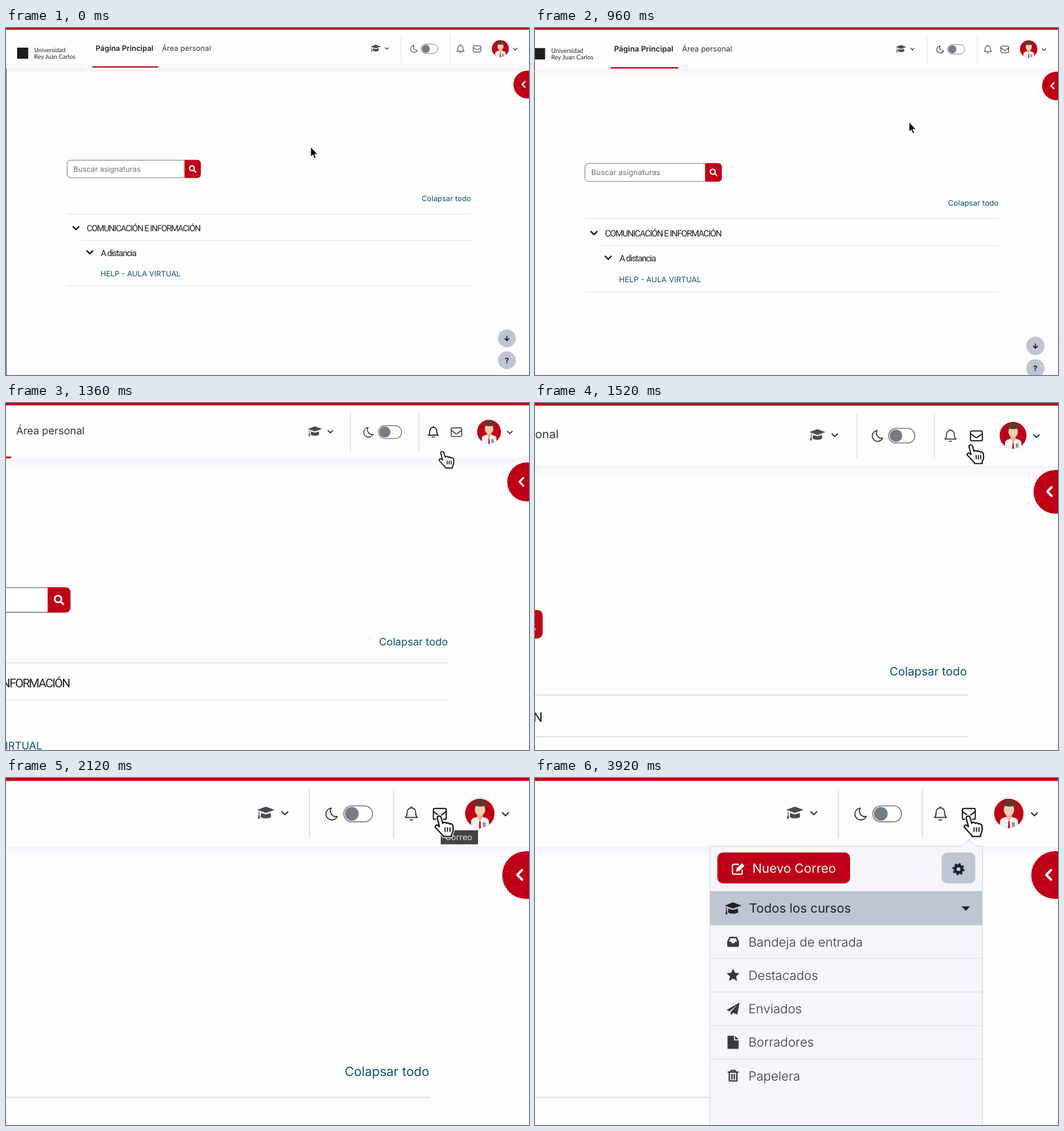
An HTML page that plays this animation: 800x531 px, repeating every 7.12 s.

```html
<!DOCTYPE html>
<html lang="es">
<head>
<meta charset="utf-8">
<title>Aula virtual</title>
<style>
  html, body { margin: 0; width: 100%; height: 100%; overflow: hidden; background: #fdfdfd; }
  svg { display: block; width: 100%; height: 100%; }
  text { font: 11.4px Inter, sans-serif; text-rendering: geometricPrecision; fill: #1d2125; }
  .logo { font: 9.2px Lato, sans-serif; }
  .current { font-weight: 600; }
  .plain { fill: #33383d; }
  .hint { fill: #6a7078; }
  .help { font-weight: 700; text-anchor: middle; }
  .link { fill: #12506e; }
  .heading { font: 13.2px Roboto, sans-serif; letter-spacing: -1.05px; }
  .tip { font-size: 12.8px; fill: #e6e6e6; }
  #menu text { font-size: 19.4px; }
  #menu .button { fill: #fff; }
  #menu .row text { font-weight: 300; fill: #343a40; }
  .red { fill: #bf0016; }
  .grey { fill: #bec5d3; }
  .dark { fill: #343a40; }
  .line { fill: none; stroke: #dee0e5; }
  .stroke { fill: none; stroke: #343a40; stroke-linecap: round; stroke-linejoin: round; }
  .stroke.white { stroke: #fff; }
  .stroke.black { stroke: #111; }
</style>
</head>
<body>
<svg viewBox="0 0 800 531" preserveAspectRatio="none">
  <defs>
    <linearGradient id="shade" x2="0" y2="1">
      <stop stop-color="#f3f3fb"/><stop offset="1" stop-color="#fdfdfd"/>
    </linearGradient>
    <clipPath id="round"><circle cx="756.2" cy="31.5" r="13.2"/></clipPath>
    <path id="cap" d="M0 3.4 7.8.5 15.6 3.4 7.8 6.2ZM3.5 6.1 7.8 7.5 12.1 6.1 12.5 9.6C10.4 11.4 5.2 11.4 3.1 9.6ZM1.4 4.9 2.1 5.1V7.8L2.6 11.4H.7L1.4 7.8Z"/>
    <path id="chevron" d="M-2.6-1.3 0 1.3 2.6-1.3"/>
    <path id="handShape" d="M-3 3C-3.5-1 2-1 3 2L5.5 11C6 8.5 10 8.5 11 11 12 9.5 15 10 16 12 18 11 20.5 12 21 14.5L21.5 20C21.5 24 20 26 19 28V31H6V29.5C2 26-1 22-5 18-7.5 15.5-5 12.5-2 14L.5 16Z"/>
  </defs>

  <g id="page">
    <rect y="61" width="800" height="10" fill="url(#shade)"/>
    <rect width="800" height="2.6" class="red"/>
    <rect y="62" width="1" height="469" fill="#666"/>

    <rect x="17" y="30" width="17" height="17" fill="#1f1f1f"/>
    <text class="logo" x="43" y="37">Universidad</text>
    <text class="logo" x="43" y="47">Rey Juan Carlos</text>
    <text class="current" x="137" y="34.7">Página Principal</text>
    <text class="plain" x="238.5" y="34.7">Área personal</text>
    <rect x="132" y="58.6" width="101" height="2" class="red"/>

    <use href="#cap" x="557.8" y="25" fill="#484c52"/>
    <g class="stroke" stroke-width="1.2">
      <use href="#chevron" x="582.5" y="31.4"/>
      <use href="#chevron" x="779" y="32.3"/>
    </g>
    <path d="M604.3 10V53.6M679.4 10V53.6" class="line"/>
    <g class="stroke">
      <path d="M623.8 26.8A5.3 5.3 0 1 0 629.2 34.2 5 5 0 0 1 623.8 26.8Z"/>
      <rect x="635" y="24.8" width="25.6" height="14.2" rx="7.1" stroke="#6a7078" stroke-width=".8"/>
    </g>
    <circle cx="642.2" cy="31.9" r="6.1" fill="#777b89"/>
    <g id="bell" class="stroke">
      <path d="M689.8 35.2C691.4 33.9 691.4 32.6 691.4 30.4A3.8 3.8 0 0 1 699 30.4C699 32.6 699 33.9 700.6 35.2ZM695.2 25.6V26.4M694 37.3H696.4"/>
    </g>
    <g id="mail" class="stroke">
      <rect x="714.8" y="27.2" width="11.5" height="9.6" rx="1.2"/>
      <path d="M715 30 719.6 33.4Q720.6 34.1 721.6 33.4L726.1 30"/>
    </g>

    <g clip-path="url(#round)">
      <circle cx="756.2" cy="31.5" r="13.2" class="red"/>
      <path d="M748.3 46V39Q748.5 36 752 35.3L756.3 34 760.6 35.3Q764.2 36 764.4 39V46Z" fill="#f4f1f0"/>
      <path d="M753.8 31H758.8V35L756.3 39 753.8 35Z" fill="#eab896"/>
      <path d="M751.8 25H760.9V29.5Q759.5 33.8 756.3 33.8 753.1 33.8 751.8 29.5Z" fill="#f5cfb4"/>
      <path d="M751.4 28.5Q749 22 753 20.3 757 17.8 761 20.8 763.5 23 761.3 28.5L760.2 25Q755.5 26 752.5 24.8Z" fill="#62372b"/>
      <path d="M755.8 38.5H756.8L757.2 45H755.4Z" class="red"/>
      <rect x="759" y="39.5" width="2.3" height="4" fill="#8b8f99"/>
    </g>

    <circle cx="797.5" cy="87.2" r="21.8" opacity=".05"/>
    <circle cx="797.5" cy="86.5" r="21.3" class="red"/>
    <path d="M793.8 82 789.6 86.3 793.8 90.6" class="stroke white" stroke-width="2.1"/>

    <path d="M273 202.3H99.5Q93.5 202.3 93.5 208.3V223.2Q93.5 229.2 99.5 229.2H273" fill="#fff" stroke="#7c8086"/>
    <path d="M273 201.8H292Q298 201.8 298 207.8V223.6Q298 229.6 292 229.6H273Z" class="red"/>
    <path d="M288.1 214.7A3.7 3.7 0 1 1 280.7 214.7 3.7 3.7 0 1 1 288.1 214.7M287.3 217.5 290.3 220.5" class="stroke white" stroke-width="1.9"/>
    <text class="hint" x="103" y="219.7">Buscar asignaturas</text>

    <text class="link" x="635.8" y="265.3">Colapsar todo</text>
    <path d="M93 284.6H712M115 325.2H712M93 394.3H712" class="line"/>
    <g class="stroke black" stroke-width="1.2">
      <use href="#chevron" transform="translate(107 306.3) scale(1.7)"/>
      <use href="#chevron" transform="translate(128.2 343.3) scale(1.7)"/>
    </g>
    <text class="heading" x="123.5" y="311">COMUNICACIÓN E INFORMACIÓN</text>
    <text class="heading" x="145" y="348.5">A distancia</text>
    <text class="link" x="144.5" y="379.6">HELP - AULA VIRTUAL</text>

    <circle cx="766.2" cy="475" r="13.7" class="grey"/>
    <circle cx="766.2" cy="508.4" r="13.7" class="grey"/>
    <path d="M766.2 471.8V478.2M763.2 475.4 766.2 478.4 769.2 475.4" class="stroke black" stroke-width="1.5"/>
    <text class="help" x="766.2" y="512.6">?</text>
  </g>

  <g id="tooltip">
    <rect x="665" y="80" width="57" height="21.5" fill="#434345"/>
    <text class="tip" x="671.5" y="95.2">Correo</text>
  </g>

  <g id="menu">
    <path d="M267.5 540V104H652.5L663 94 673.5 104H684.5V540Z" fill="#f6f6fc" stroke="#d3d7df"/>
    <rect x="279" y="114" width="203" height="47.3" rx="8.5" class="red"/>
    <path d="M311 132H304.5Q302 132 302 134.5V145Q302 147.3 304.5 147.3H314.5Q317 147.3 317 145V141" class="stroke white" stroke-width="2"/>
    <path d="M307.5 143 308.2 138.7 316.5 130.4 320.5 134.3 312 142.5Z" fill="#fff"/>
    <text class="button" x="332.5" y="145.3">Nuevo Correo</text>
    <rect x="622" y="114" width="51.5" height="47.3" rx="9" class="grey"/>
    <g fill="none" stroke="#1d2125">
      <circle cx="647.8" cy="139.5" r="5.2" stroke-width="4.4"/>
      <circle cx="647.8" cy="139.5" r="8" stroke-width="2.6" stroke-dasharray="3.14"/>
    </g>
    <rect x="268" y="173" width="416" height="52.3" class="grey"/>
    <use href="#cap" transform="translate(290 189.5) scale(1.66)" fill="#1d2125"/>
    <text x="327.5" y="206">Todos los cursos</text>
    <path d="M652.5 196.5H665.5L659 203.2Z" fill="#1d2125"/>
    <path d="M268 276H684M268 327.5H684M268 378.8H684M268 430H684" class="line"/>
    <g class="row">
      <path fill-rule="evenodd" d="M297.5 243H308.5L312 250V256.5Q312 258.5 310 258.5H296Q294 258.5 294 256.5V250ZM299 245.3 296.7 250.5H299.8L301.2 253H304.8L306.2 250.5H309.3L307 245.3Z" class="dark"/>
      <text x="326.5" y="258">Bandeja de entrada</text>
      <path id="star" class="dark"/>
      <text x="326.5" y="309">Destacados</text>
      <path d="M313 343.5 293 355 297.5 357 309 347.5 299.5 358V363.5L303 359.3 309.5 362Z" class="dark"/>
      <text x="326.5" y="360">Enviados</text>
      <path d="M294.5 394.5H304.5V401.5H311.5V414.5H294.5ZM306 394.5 311.5 400H306Z" class="dark"/>
      <text x="326.5" y="411.3">Borradores</text>
      <path d="M295.5 450H310.5M300 449V447.5H306V449M297.3 451V463.5H308.7V451M301.2 453.5V460.5M304.8 453.5V460.5" class="stroke" stroke-width="2.2"/>
      <text x="326.5" y="462.7">Papelera</text>
    </g>
  </g>

  <circle id="ripple" cx="663.3" cy="54.5" fill="#ffd21c"/>

  <g id="cursor">
    <path id="arrow" d="M0 0V15.2L3.4 12.1 5.8 17.7 8.2 16.7 5.8 11.2H10.7Z" stroke="#fff"/>
    <g id="hand" transform="scale(.582)" stroke-linejoin="round">
      <use href="#handShape" fill="#fff" stroke="#fff" stroke-width="4.5"/>
      <use href="#handShape" fill="#fff" stroke="#111" stroke-width="2"/>
      <path d="M9 17V24M12.8 17V24M16.6 17V24" stroke="#111" stroke-width="1.7"/>
    </g>
  </g>
</svg>
<script>
const LOOP = 7120, STEP = 40;
const MOVE = 760, SETTLED = 1840, TOOLTIP = 2120, CLICK = 3440, MENU = 3560;
const ZOOM = { start: 847, end: 1807, scale: 1.717 };

const el = id => document.getElementById(id);
const clamp = v => Math.min(1, Math.max(0, v));
const mix = (a, b, k) => a + (b - a) * k;
const show = (id, on) => el(id).style.display = on ? '' : 'none';
const easeSine = u => (1 - Math.cos(Math.PI * clamp(u))) / 2;

// Damped spring from 0 to 1; damping below 1.
function spring(ms, frequency, damping) {
  const x = Math.max(0, ms) * frequency;
  const root = Math.sqrt(1 - damping * damping);
  return 1 - Math.exp(-damping * x) * (Math.cos(root * x) + damping / root * Math.sin(root * x));
}

function starPath(cx, cy, radius) {
  const points = Array.from({ length: 10 }, (_, i) => {
    const r = i % 2 ? radius * .47 : radius, a = i * Math.PI / 5;
    return [cx + r * Math.sin(a), cy - r * Math.cos(a)].map(v => v.toFixed(2));
  });
  return `M${points.join('L')}Z`;
}

function render(t) {
  const scale = mix(1, ZOOM.scale, easeSine((t - ZOOM.start) / (ZOOM.end - ZOOM.start)));
  const view = `translate(${800 * (1 - scale)} 0) scale(${scale})`;
  el('page').setAttribute('transform', view);

  const moved = Math.min(t, SETTLED) - MOVE;
  const x = mix(466, 720.6, spring(moved, .0074, .99));
  const y = mix(182, 34.8, spring(moved, .005, .85));
  const pointing = y < 60;
  const onMail = x >= 708.5;
  el('cursor').setAttribute('transform', `${view} translate(${x} ${y})`);
  show('arrow', !pointing);
  show('hand', pointing);
  el('bell').style.stroke = pointing && !onMail ? '#000' : '';
  el('mail').style.stroke = pointing && onMail ? '#000' : '';

  show('tooltip', t >= TOOLTIP && t < MENU);
  show('menu', t >= MENU);

  const p = clamp((t - CLICK) / 480), spread = 1 - (1 - p) ** 2;
  show('ripple', t >= CLICK);
  el('ripple').setAttribute('r', mix(4, 27, spread));
  el('ripple').setAttribute('opacity', mix(.9, .02, spread));
}

function tick() {
  const t = performance.now() % LOOP;
  render(Math.floor(t / STEP) * STEP);
  requestAnimationFrame(tick);
}

el('star').setAttribute('d', starPath(303, 302, 10.5));
tick();
</script>
</body>
</html>
```
